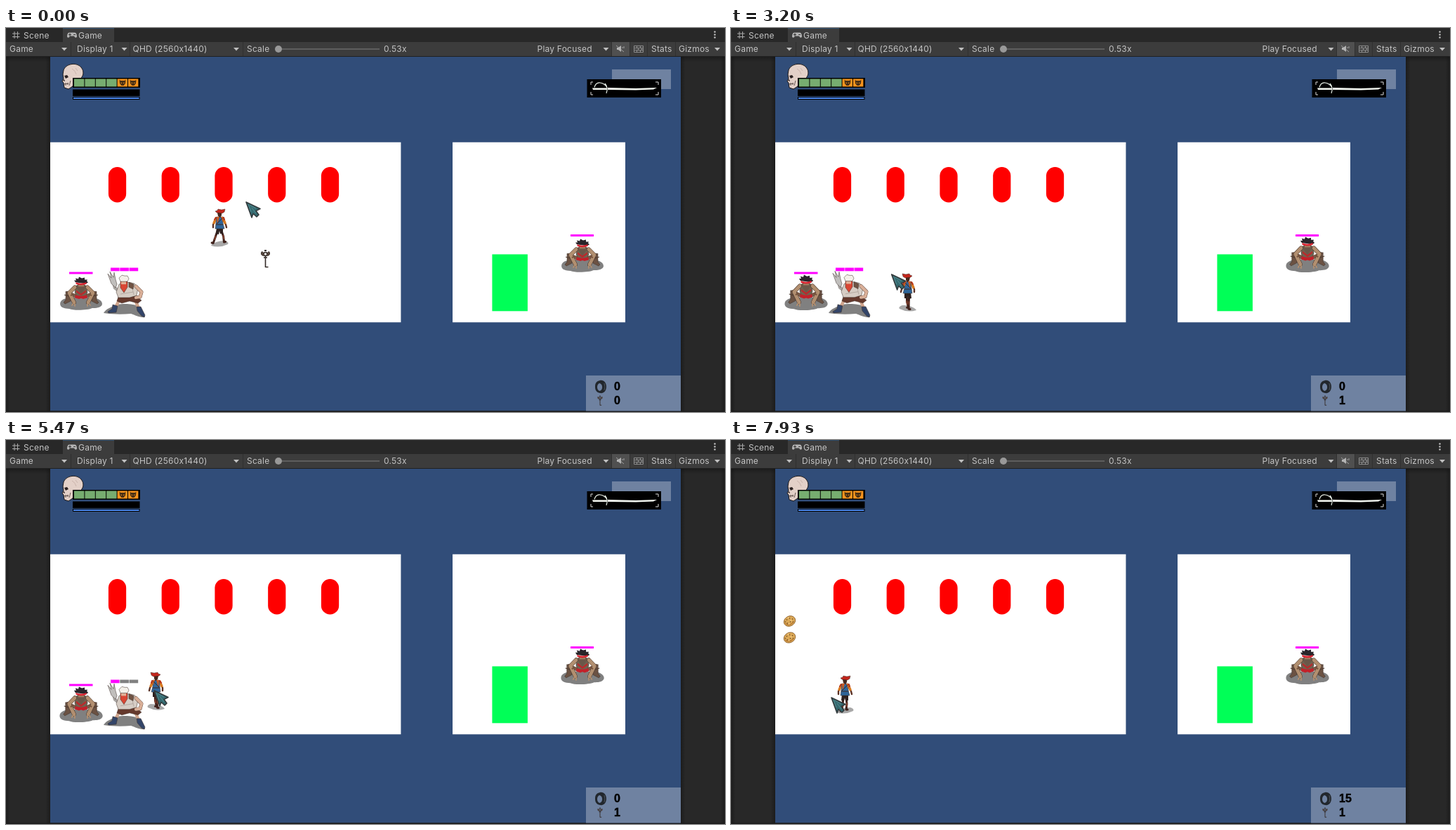
An HTML page for the animation above (8000 ms loop, 1024 by 547 pixels).

```html
<!DOCTYPE html>
<html lang="en">
<head>
<meta charset="utf-8">
<title>Game view</title>
<style>
html,body{margin:0;width:100%;height:100%;overflow:hidden;background:#282828}
svg{display:block;width:1024px;height:547px}
.ui{font:12px Inter,sans-serif;letter-spacing:.22px;fill:#c4c4c4}
.num{font:bold 16px "Liberation Sans",Arial,sans-serif;stroke:#000;stroke-width:.4}
.limb{fill:none;stroke-linecap:round;stroke-linejoin:round}
.ink{stroke:#3a2c26;stroke-width:.5;stroke-linejoin:round}
</style>
</head>
<body>
<svg viewBox="0 0 1024 547">
<defs>
  <filter id="hurt" color-interpolation-filters="sRGB"><feColorMatrix values="1.1 0 0 0 0  0 0 0 0 0  0 0 0 0 0  0 0 0 1 0"/></filter>
  <linearGradient id="edge" x1="0" x2="1"><stop offset="0" stop-color="#1c1c1c"/><stop offset=".1" stop-color="#282828"/><stop offset=".9" stop-color="#282828"/><stop offset="1" stop-color="#1c1c1c"/></linearGradient>
  <linearGradient id="fade" x2="0" y2="1"><stop offset="0" stop-color="#111" stop-opacity=".5"/><stop offset="1" stop-color="#111" stop-opacity="0"/></linearGradient>
  <path id="drop" d="M-4-2h8l-4 4.5z" fill="#c0c0c0"/>
  <g id="key" fill="none" stroke="#332a26" stroke-width="1.600">
    <circle cy="-8" r="2.500"/><path d="M-2.500-9q-3-5-3.500 0 0 4 4.500 3M2.500-9q3-5 3.500 0 0 4-4.500 3" fill="#5a4a40" stroke-width="1"/>
    <path d="M0-5V11M0 10.500h4M-2.500-3h5"/><path d="M0-12v-2" stroke-width="3"/>
  </g>
  <g id="cookie">
    <ellipse rx="8.500" ry="7" transform="rotate(-30)" fill="#dca957" stroke="#8a5a24" stroke-width=".8"/>
    <path d="M-6 3q5 5 11-1" fill="none" stroke="#b5772f" stroke-width="1.500"/>
    <path d="M-4-2h.1M0-4h.1M4-3h.1M1 1h.1M-3 3h.1M5 1h.1M-6 1h.1" class="limb" stroke="#64401f" stroke-width="1.500"/>
    <path d="M-2-5h.1M2-1h.1M-1 4h.1" class="limb" stroke="#f3d08c" stroke-width="1.800"/>
  </g>
  <g id="skullMark" fill="#4a3115"><path d="M-4.500-4l2 1h5l2-1-.5 5-2.500 3h-3l-2.500-3z"/><path d="M-2.500 0l1.500.6M2.500 0l-1.500.6" stroke="#f7941d"/></g>
  <path id="bruteShade" d="M77 393c0-6 7-8 14-9h32c9 1 15 5 14 10-2 5-9 5-14 5-6 3-27 4-33 1-7 0-13-2-13-7z" fill="#808080"/>
  <g id="brute">
    <path d="M100 382l-12-5M114 382l12-5" class="limb" stroke="#7a5a48" stroke-width="5"/>
    <path d="M85 375l6 1 1 13-8 4-2-2 3-4zM129 375l-6 1-1 13 8 4 2-2-3-4z" fill="#6b5243" class="ink"/>
    <path d="M83 380l8 2M131 380l-8 2" stroke="#4c382d"/>
    <path d="M99 367q8-3 16 0l1 9-2 6-7 2-7-2-2-6z" fill="#6f6250" class="ink"/>
    <path d="M99 380q8 3 16 0l1 4-6 2-3-1-3 1-6-2z" fill="#c2212a"/>
    <path d="M100 373l7 5 7-5v3l-7 5-7-5z" fill="#b92a2c"/>
    <path d="M98 369l-8 8 7 14M116 369l8 8-7 14" class="limb" stroke="#4a382e" stroke-width="5.800"/>
    <path d="M98 369l-8 8 7 14M116 369l8 8-7 14" class="limb" stroke="#b28f70" stroke-width="4.800"/>
    <path d="M92 381l4-2M122 381l-4-2" stroke="#76533d" stroke-width="2"/>
    <path d="M96 392l-2 3M98 393v3M118 392l2 3M116 393v3" class="limb" stroke="#b28f70" stroke-width="1.800"/>
    <path d="M102 364h10l1 6-6 8-6-8z" fill="#6a5749"/>
    <path d="M103 365.500h8v2.500h-8z" fill="#a17c60"/>
    <path d="M99 362l-2-3 3 0-1-3 4 1 1-3 4 2 4-1 0 3 4 0-1 2 2 2-3 2z" fill="#29252a"/>
    <path d="M99.500 362q7.500 3 15 0v2.500q-7.500 3-15 0z" fill="#da2430"/>
  </g>
</defs>

<!-- editor chrome -->
<rect width="1024" height="547" fill="#282828"/>
<rect x="81" width="73" height="20" fill="#3c3c3c"/><rect x="81" width="73" height="1" fill="#2c4a68"/>
<rect y="20" width="1024" height="20" fill="#3c3c3c"/>
<rect x="863" y="20" width="25" height="20" fill="#505050"/>
<path d="M92.500 20v20M176.500 20v20M337.500 20v20M862.500 20v20M888.500 20v20M913.500 20v20M953.500 20v20" stroke="#303030"/>
<rect y="40" width="1024" height="1" fill="#202020"/>
<g class="ui">
  <text x="25" y="14.500">Scene</text><text x="103" y="14.500">Game</text>
  <text x="5" y="34">Game</text><text x="101" y="34">Display 1</text><text x="180.500" y="34">QHD (2560x1440)</text>
  <text x="343" y="34">Scale</text><text x="538" y="34">0.53x</text><text x="756.500" y="34">Play Focused</text>
  <text x="919" y="34">Stats</text><text x="958" y="34">Gizmos</text>
</g>
<use href="#drop" x="83" y="30"/><use href="#drop" x="168.500" y="30"/><use href="#drop" x="328" y="30"/><use href="#drop" x="854.500" y="30"/><use href="#drop" x="1013" y="30"/>
<path d="M388 30h144" stroke="#5e5e5e" stroke-width="2"/><circle cx="388" cy="30" r="5" fill="#999"/>
<path d="M12 5v10M16.500 5v10M9 8h10.500M9 12.500h10.500" stroke="#aaa"/>
<path d="M90 6.500h8c2 0 3 3 3 6q-2 3-4-1h-6q-2 4-4 1c0-3 1-6 3-6z" fill="#b4b4b4"/><path d="M89 9.500h4M91 7.500v4M96 9.500h3" stroke="#3c3c3c" stroke-width="1.200"/>
<g fill="#c4c4c4"><circle cx="1009.500" cy="5.500" r="1.200"/><circle cx="1009.500" cy="9.500" r="1.200"/><circle cx="1009.500" cy="13.500" r="1.200"/></g>
<path d="M870 28h2l4-3v9l-4-3h-2z" fill="#b4b4b4"/><path d="M869 25l11 9M878 27v2M880 26v3" stroke="#b4b4b4" stroke-width=".8"/>
<path d="M894.500 25.500h13v9h-13zM895 28.500h12M895 31.500h12M898.500 26v3M903.500 26v3M900.500 29v3M905.500 29v3M898.500 32v3M903.500 32v3" fill="none" stroke="#a0a0a0" stroke-width=".8"/>

<!-- level -->
<rect y="41" width="63" height="506" fill="url(#edge)"/><rect x="961" y="41" width="63" height="506" fill="url(#edge)"/>
<rect y="41" width="1024" height="7" fill="url(#fade)"/>
<rect x="63" y="41" width="898" height="504.500" fill="#314d79"/><rect y="545.500" width="1024" height="1.500" fill="#1b1b1b"/>
<path d="M63 162.700h499.400v256.600H63zM636 162.700h246v256.600H636z" fill="#fff"/>
<g id="pills" fill="#f00"></g>
<rect x="692.400" y="322.400" width="50.500" height="80.900" fill="#00ff57"/>

<!-- HUD -->
<path d="M82 60c3-9 18-12 25-4 5 6 3 13-1 16l-7 3-4 8-6 4-6-2-1-7-2-2 2-4-1-6z" fill="#e3d0c8" stroke="#1a1515"/>
<path d="M83 68l4-1 2 3-4 2zM81 75l2-2 1 3z" fill="#2a2020"/><path d="M83 80l6-1M92 75l-2 7M85 78v4M88 78v3" stroke="#4a3a36" stroke-width=".8"/>
<path d="M94 58q5 3 6 8M99 57l3 4" fill="none" stroke="#c3ada5" stroke-width=".8"/>
<rect x="95" y="71" width="96" height="14"/><g id="cells"></g>
<use href="#skullMark" x="166" y="78"/><use href="#skullMark" x="181" y="78"/>
<rect x="95" y="87.500" width="95.500" height="9.500"/><rect x="95" y="98" width="95.500" height="4"/><rect x="96" y="99" width="93.500" height="2" fill="#4a88ee"/>
<rect x="863" y="59" width="84" height="28" fill="#6f82a1"/><rect x="827.500" y="73" width="105.500" height="26"/>
<path d="M833 81v-4h3M925 77h4v4M929 91v4h-4M836 95h-3v-4" fill="none" stroke="#ddd"/>
<path d="M835 85.500h21v2.500h-20zM857 85l40 1 30-1-5 2.500-25 1-40-.5z" fill="#f4f8f2"/>
<path d="M838 84.500q2-7 8-6.500 7 1 10 7M853 79q5 6 2 14" fill="none" stroke="#e6eee6" stroke-width="1.200"/>
<rect x="826" y="495" width="135" height="50.500" fill="#6f82a1"/>
<path d="M846 502c6-1 9 4 9 9s-3 10-9 9c-5-1-7-4-7-9s2-8 7-9zm-1 4c-4 2-4 9 0 11 5 0 6-10 0-11z" fill="#22272d"/><path d="M852 506q2 5 0 10" fill="none" stroke="#4c545c"/>
<use href="#key" transform="translate(846 531.500) scale(.55)"/>
<text class="num" id="coins" x="866" y="516"></text><text class="num" id="keys" x="866" y="536"></text>

<!-- actors -->
<use id="pickup" href="#key" x="369.500" y="330"/>
<use id="cookieA" href="#cookie"/><use id="cookieB" href="#cookie"/>
<g id="foe"><use class="shade" href="#bruteShade"/><use class="breath" href="#brute"/><path d="M90 349h33.500" stroke="#f0f" stroke-width="3"/></g>
<g transform="translate(714 -54)"><use class="shade" href="#bruteShade"/><use class="breath" href="#brute"/><path d="M90 349.500h33" stroke="#f0f" stroke-width="3"/></g>
<g id="chef">
  <path d="M139 406c3-6 12-9 20-12 9-2 24-1 31 3l8 15c-7 1-14-3-20-5-12 1-26 1-39-1z" fill="#808080"/>
  <g id="chefBody">
    <path d="M161 388l-5 10M184 388l5 11" class="limb" stroke="#cfa48c" stroke-width="4.500"/>
    <path d="M160 383l25-1 8 6-5 4-12-3-11 3-7-3z" fill="#65392d" class="ink"/>
    <path d="M152 394l7 2-2 9-11 1-1-2 6-4zM186 397l6 0 6 12-1 3-4-2-6-7z" fill="#334569" class="ink"/>
    <path d="M162 376l-7-6-2-8" class="limb" stroke="#a9a5a2" stroke-width="4.500"/>
    <path d="M150 364l-5-14 5 6-2-9 5 8 1-7 2 10 2 7-2 5z" fill="#c0bebc" class="ink"/>
    <path d="M161 365q11-5 22-1l5 6-2 11-10 3-16 0-3-8z" fill="#d6cdc5" class="ink"/>
    <path d="M163 379l18-3M180 371l2 9" stroke="#aba098" stroke-width=".8" fill="none"/>
    <path d="M175 362l7 3-1 7-6-3z" fill="#705344" class="ink"/>
    <path d="M185 368l8 8-2 7-6 1" class="limb" stroke="#5a4036" stroke-width="5"/>
    <path d="M185 368l8 8-2 7-6 1" class="limb" stroke="#d9af98" stroke-width="4.200"/>
    <path d="M163 361h10l0 8-5 8-5-7z" fill="#d94634" class="ink"/><path d="M164 361h7v4h-7z" fill="#dfb097"/>
    <path d="M163 361l-2-5 4-4 4 1 4 0 2 4-2 4z" fill="#f4f0e9" class="ink"/>
  </g>
  <g id="hearts"></g>
</g>
<g id="hero">
  <path d="M-12 52c2-4 11-7 20-7q6 2 4 5-12 6-24 2z" fill="#a8a8a8"/>
  <g id="legA"><path d="M-2 30l-1 11-1 9h-2" class="limb" stroke="#3f211b" stroke-width="3"/><path d="M-3 39v6" stroke="#8f4530" stroke-width="1.500"/></g>
  <g id="legB"><path d="M2 30l1 10-1 8h2" class="limb" stroke="#3f211b" stroke-width="3"/><path d="M3 38v6" stroke="#8f4530" stroke-width="1.500"/></g>
  <path d="M-4 26h9l0 9H1l-1-4-1 5-4-1z" fill="#2e211f"/>
  <path d="M-5 13l-3 7M5 13l3 7" class="limb" stroke="#d87a20" stroke-width="3.500"/>
  <path d="M-5 12l-2 3M6 12l1 3" class="limb" stroke="#b5301f" stroke-width="2"/>
  <path d="M-9 22v4M9 22l1 4" class="limb" stroke="#5c3226" stroke-width="2.400"/>
  <path d="M-4 11h9l0 9 2 8H-6l1-8z" fill="#2f6599" class="ink"/>
  <path d="M-4 11h4l-3 10zM5 11v8l-3-8z" fill="#cf5b20"/><path d="M-4 21L4 13M-5 22h10" stroke="#3a2824"/>
  <path d="M-3 5h6l0 4-2 3-3-2z" fill="#45271c"/>
  <path d="M-6 3l3-1 1-2 5 1 5-1-1 4-3 2-8-1z" fill="#c4261c" class="ink"/>
</g>
<g id="slash" fill="none"><path d="M-24 13Q-4-11 19-18" stroke="#32dc42" stroke-width="1.400"/><path d="M11 3L5-11" stroke="#3f8a40" stroke-width="1.200"/><path d="M7 14l4-8-2-3" stroke="#57301f" stroke-width="2.500"/></g>
<g id="cursor"><path d="M0 0l20 9.500-6 3 4 5.500-3 3-5-4.500-2 5.500z" fill="#356a70" stroke="#333a3c" stroke-width="1.600" stroke-linejoin="round"/><path d="M3 3l4 11M5 4l9 5M8 8l6 8" stroke="#5b9399" stroke-width=".8" fill="none"/></g>
</svg>
<script>
const $ = id => document.getElementById(id);
const all = s => [...document.querySelectorAll(s)];
const LOOP = 8000, STEP = 1000 / 15;
const KEY_AT = 1500, HITS = [4060, 4900, 5720, 7400];
const [, , CHEF_DIES, FOE_DIES] = HITS;

const heroPath = [
  [0, 304, 258], [600, 308, 254], [930, 314, 252], [1130, 324, 258], [1530, 352, 282], [1800, 342, 290],
  [2200, 313, 300], [2670, 280, 292], [3200, 252, 350], [3500, 240, 364], [3700, 236, 364], [4060, 216, 342],
  [4500, 216, 340], [5470, 214, 331], [5900, 220, 338], [6600, 206, 341], [6750, 206, 341], [7200, 178, 338], [7600, 162, 336]
];
const cursorPath = [
  [0, 342, 248], [130, 342, 248], [700, 393, 295], [2270, 393, 295], [3300, 211, 357], [5600, 211, 357], [6300, 143, 367]
];

function along(path, t) {
  const i = path.findIndex(p => p[0] > t);
  if (i < 0) return path[path.length - 1].slice(1);
  const [a, b] = [path[i - 1], path[i]], k = (t - a[0]) / (b[0] - a[0]);
  return [1, 2].map(j => a[j] + (b[j] - a[j]) * k);
}
const rect = (x, y, w, h, more = '') => `<rect x="${x}" y="${y}" width="${w}" height="${h}" ${more}/>`;
const repeat = (n, f) => Array.from({length: n}, (_, i) => f(i)).join('');
const move = (id, v) => $(id).setAttribute('transform', v);
const show = (id, on) => $(id).style.display = on ? '' : 'none';
// scale about a fixed point
const scaleAt = (x, y, sx, sy) => `translate(${x} ${y}) scale(${sx} ${sy}) translate(${-x} ${-y})`;

$('pills').innerHTML = repeat(5, i => rect(145.9 + i * 75.75, 198, 25.25, 50.5, 'rx="12.6"'));
$('cells').innerHTML = repeat(6, i => rect(97 + i * 15.4, 72.5, 14.4, 11, `fill="${i < 4 ? '#77ad70' : '#f7941d'}"`));
$('hearts').innerHTML = repeat(3, i => rect(149 + i * 13.3, 341.5, 12.6, 4.8));

function popCookie(id, y, age) {
  show(id, age >= 0);
  const k = Math.min(1, Math.max(0, age / 600));
  move(id, `translate(83.5 ${y}) scale(${1 + .1 * Math.sin(k * Math.PI * 3) * (1 - k)})`);
}

function draw(t) {
  const breath = Math.cos((t - 5470) / 2400 * 2 * Math.PI);
  all('.breath').forEach(e => e.setAttribute('transform', scaleAt(107, 396, 1 + .012 * breath, 1 + .06 * breath)));
  all('.shade').forEach(e => e.setAttribute('transform', scaleAt(107, 392, 1 + .02 * breath, 1 + .03 * breath)));
  move('chefBody', scaleAt(170, 408, 1, 1 + .012 * breath));

  const [x, y] = along(heroPath, t), [nx, ny] = along(heroPath, t + 60);
  const swing = Math.min(1, Math.hypot(nx - x, ny - y) / .6) * 14 * Math.cos(t / 90);
  const right = t < 1600 || t > 7150;
  move('hero', `translate(${x} ${y}) scale(${right ? 1 : -1} 1)`);
  move('legA', `rotate(${swing} 0 28)`);
  move('legB', `rotate(${-swing} 0 28)`);

  const hit = HITS.find(h => t >= h - 100 && t < h + 135);
  show('slash', hit);
  if (hit) move('slash', `translate(${x} ${y}) rotate(${(hit + 70 - t) * .7} 4 18)`);
  move('cursor', `translate(${along(cursorPath, t)})`);

  const taken = HITS.filter(h => t >= h).length;
  const hurt = HITS.some(h => t >= h && t < h + 200);
  $('chefBody').setAttribute('filter', hurt ? 'url(#hurt)' : 'none');
  [...$('hearts').children].forEach((r, i) => r.setAttribute('fill', i < 3 - taken ? '#f0f' : '#808080'));
  show('chef', t < CHEF_DIES);
  show('foe', t < FOE_DIES);
  show('pickup', t < KEY_AT);
  popCookie('cookieA', 258, t - CHEF_DIES);
  popCookie('cookieB', 281.5, t - FOE_DIES);
  $('coins').textContent = t < CHEF_DIES ? 0 : t < FOE_DIES ? 5 : 15;
  $('keys').textContent = t < KEY_AT ? 0 : 1;
}

const start = performance.now();
function tick() {
  const t = (performance.now() - start) % LOOP;
  draw(Math.floor((t + 4) / STEP) * STEP % LOOP);
  requestAnimationFrame(tick);
}
tick();
</script>
</body>
</html>
```
